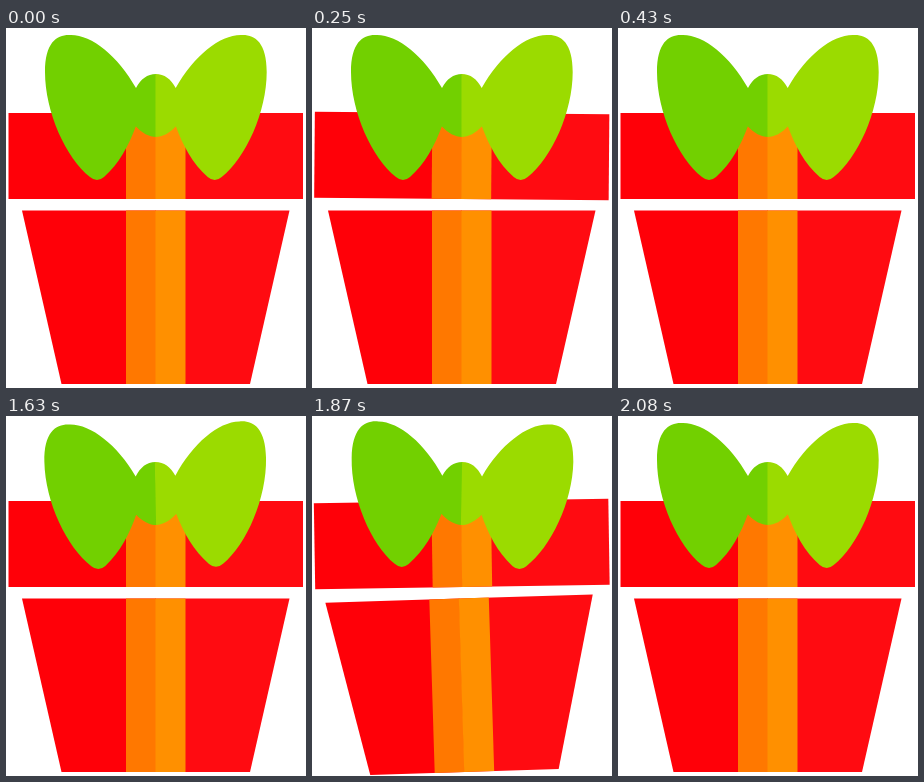
Recreate the animation shown at these times as an HTML page. Size 300 px wide and 360 px high, loop 5.48 s.

```html
<!DOCTYPE html>
<html lang="en">
<head>
<meta charset="utf-8">
<title>Shaking gift box</title>
<style>
  html, body { margin: 0; width: 100%; height: 100%; overflow: hidden; background: #fff; }
  svg { display: block; width: 100%; height: 100%; }
</style>
</head>
<body>
<svg viewBox="0 0 300 360">
  <defs>
    <path id="wing" d="M130 60C112 28 86 7 65 7C52 6 39 13 39 44C39 84 60 130 84 149Q91 155 98 149C113 136 123 117 130 98L131 80Z
      M150.2 46C141 46 135 51 130 60L129.5 98C136 105 143 109 150.2 109Z"/>
  </defs>
  <g id="body">
    <path fill="#ff0008" d="M16 182.5H150V356H55.5Z"/>
    <path fill="#ff0b11" d="M149.5 182.5H283.5L244 356H149.5Z"/>
    <path fill="#ff7800" d="M120 182.5h30V356h-30Z"/>
    <path fill="#ff9000" d="M149.5 182.5h30V356h-30Z"/>
  </g>
  <g id="lid">
    <path fill="#ff0008" d="M2.5 85H150V171H2.5Z"/>
    <path fill="#ff0b11" d="M149.5 85H297V171H149.5Z"/>
    <path fill="#ff7800" d="M120 85h30v86h-30Z"/>
    <path fill="#ff9000" d="M149.5 85h30v86h-30Z"/>
  </g>
  <g id="bow">
    <use href="#wing" fill="#72d000"/>
    <use href="#wing" fill="#9bdb00" transform="translate(299.7) scale(-1 1)"/>
  </g>
</svg>
<script>
const LOOP = 5480, STEP = 30;

// Each part rocks about its centre; period and lead are in steps.
const parts = {
  bow: { y: 78, amp: 1.25, period: 6, lead: 2 },
  lid: { y: 128, amp: 2.25, period: 7.5, lead: 0 },
  body: { y: 269, amp: 2.4, period: 3.75, lead: 0 }
};
const shakes = [
  { start: 130, steps: 10, bodyLag: 2.125 },
  { start: 1630, steps: 15, bodyLag: 0 }
];

const swing = ({ amp, period, lead }, k) => -amp * Math.sin(2 * Math.PI * (k + lead) / period);

function draw(now) {
  const t = now % LOOP;
  const shake = shakes.find(s => t >= s.start && t < s.start + s.steps * STEP);
  for (const [id, part] of Object.entries(parts)) {
    let angle = 0;
    if (shake) {
      const k = Math.floor((t - shake.start) / STEP);
      angle = swing(part, id === 'body' ? k - shake.bodyLag : k);
    }
    document.getElementById(id).setAttribute('transform', `rotate(${angle} 149.75 ${part.y})`);
  }
}

let begin;
function tick(now) {
  begin ??= now;
  draw(now - begin);
  requestAnimationFrame(tick);
}
draw(0);
requestAnimationFrame(tick);
</script>
</body>
</html>
```
